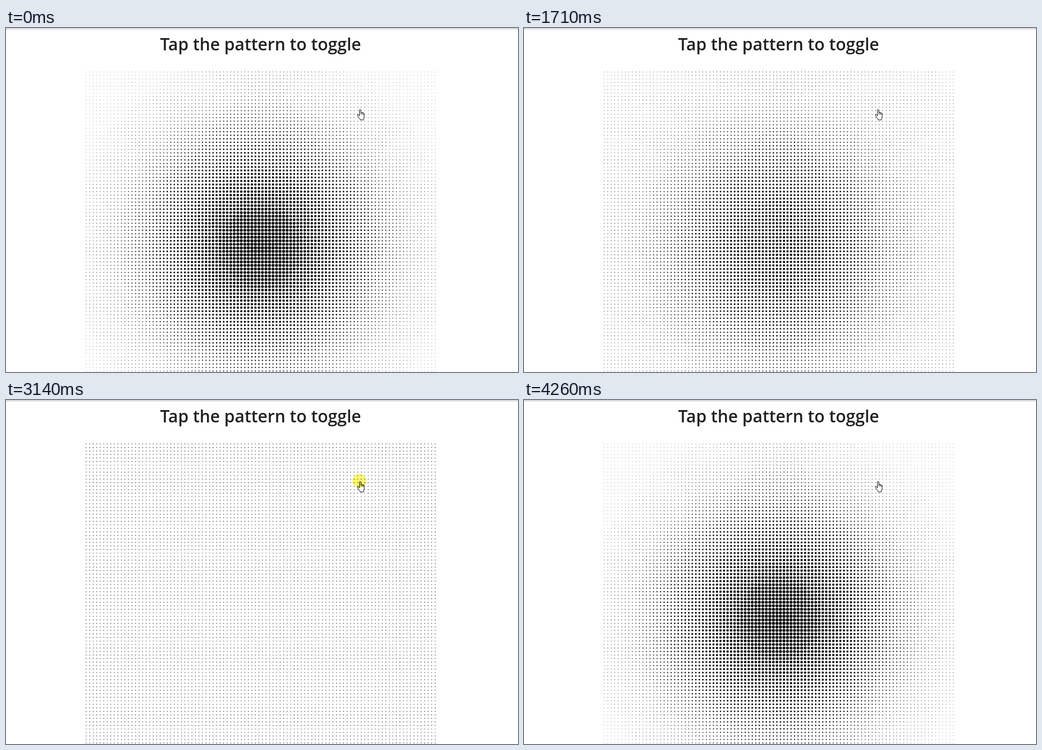
Animation, 912 px wide and 614 px high, one loop 5160 ms. Source, as an HTML page with a canvas:

```html
<!DOCTYPE html>
<html lang="en">
<head>
<meta charset="utf-8">
<title>Tap the pattern to toggle</title>
<style>
  html, body { margin: 0; width: 100%; height: 100%; overflow: hidden; background: #fff; }
  canvas, svg { position: absolute; left: 0; top: 0; display: block; }
  text { font: 600 30px "Open Sans", "Noto Sans", sans-serif; fill: #212121; }
  #halo { mix-blend-mode: multiply; }
</style>
</head>
<body>
<canvas id="dots" width="912" height="614"></canvas>
<svg width="912" height="614" viewBox="0 0 912 614">
  <rect y="1" width="912" height="1" fill="#b0b0b0"/>
  <text x="453.5" y="40" text-anchor="middle" textLength="auto">Tap the pattern to toggle</text>
  <g fill="#fff" stroke="#111" stroke-width="1" stroke-linejoin="round" stroke-linecap="round">
    <path d="M629.5 156.5V146.8Q629.5 145.5 630.8 145.5T632.1 146.8V150.6Q633.2 149.8 634.2 151Q635.3 150.4 636.1 151.7Q638 151.4 638 153.3V157.6Q638 160 636.8 161.4V164H630.6V162.4Q628.6 160.4 626.2 156.6Q625.3 155 626.4 154.4Q627.6 153.9 629.5 156.5Z"/>
    <path d="M632.1 150.6V154M634.2 151V154.3M636.1 151.7V154.6" fill="none" stroke-width=".8"/>
  </g>
  <circle id="halo" cx="629.5" cy="144.5" r="12.5" fill="#fbf772"/>
</svg>
<script>
const LOOP = 5160, COLS = 100, ROWS = 86, PITCH = 6.28, X0 = 142.8, Y0 = 78.4;
const CENTER = (COLS - 1) / 2, SMALL = 0.7, EASE_MS = 620;
const STEPS = [1510, 1610, 1710, 1810, 1910, 2030, 2230,
               3540, 3640, 3740, 3840, 3940, 4160, 4260];
const TAPS = [1110, 3140];
const halo = document.getElementById('halo');
const ctx = document.getElementById('dots').getContext('2d');
let shown = -1;

function ease(u) {
  u = Math.min(1, Math.max(0, u));
  return u < 0.5 ? 4 * u ** 3 : 1 - 4 * (1 - u) ** 3;
}

// 1 = radial halftone, 0 = even dots
function spread(t) {
  const at = STEPS.filter(s => s <= t).pop() || 0;
  const [shrink, grow] = TAPS.map(tap => ease((at - tap - 333) / EASE_MS));
  return 1 - shrink + grow;
}

function drawDots(k) {
  ctx.clearRect(0, 0, 912, 614);
  ctx.fillStyle = '#0c0c0c';
  ctx.beginPath();
  for (let j = 0; j < ROWS; j++) {
    for (let i = 0; i < COLS; i++) {
      const d = Math.hypot(i - CENTER, j - CENTER) * PITCH;
      const full = 0.38 + 2.45 * Math.exp(-((d / 195) ** 2));
      const r = SMALL + (full - SMALL) * k;
      const x = X0 + i * PITCH, y = Y0 + j * PITCH;
      ctx.moveTo(x + r, y);
      ctx.arc(x, y, r, 0, 2 * Math.PI);
    }
  }
  ctx.fill();
}

function render(t) {
  const k = spread(t);
  if (k !== shown) drawDots(shown = k);
  const pressed = TAPS.some(tap => t >= tap && t < tap + 100);
  halo.setAttribute('visibility', pressed ? 'visible' : 'hidden');
}

const start = performance.now();
function tick() {
  render((performance.now() - start) % LOOP);
  requestAnimationFrame(tick);
}
tick();
</script>
</body>
</html>
```
